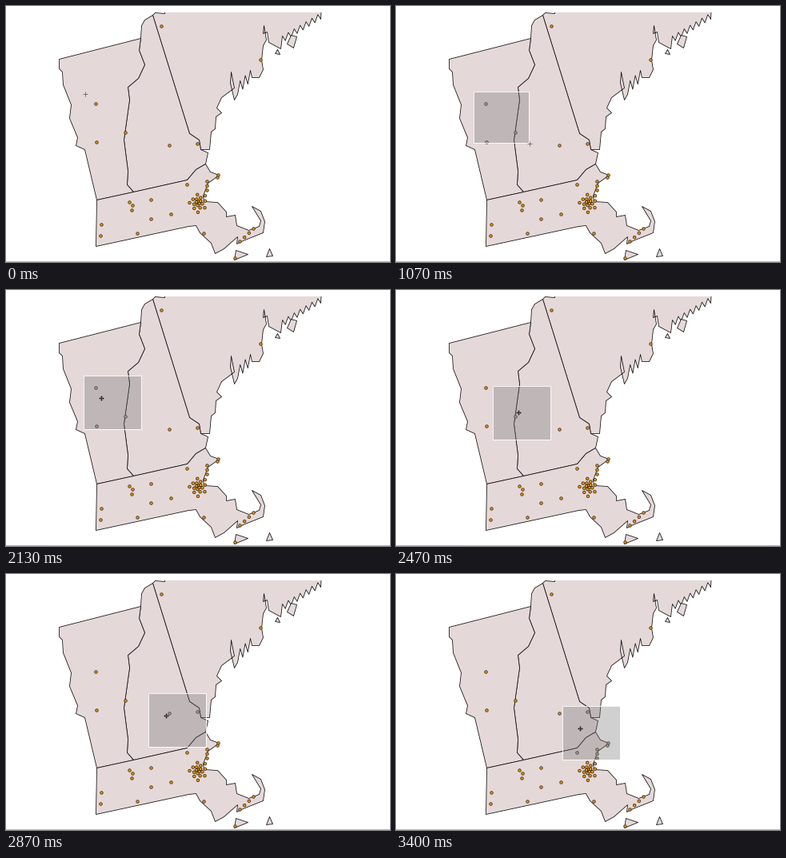
Write a matplotlib script that moves like this. It is 480x320 px and loops after 3740 ms.

```python
import numpy as np
import matplotlib.pyplot as plt
from matplotlib.animation import FuncAnimation
from matplotlib.collections import PolyCollection
from matplotlib.patches import PathPatch, Rectangle
from matplotlib.path import Path

W, H, DPI = 480, 320, 100
PX = 72 / DPI
TICK, LOOP = 10, 3740
STEPS_PER_TICK = 0.15          # the picture advances 15 times a second

LAND, ORANGE, PICKED = "#e5d8d9", "#eb9c1c", "#b0b9bd"


def teeth(start, end, count, depth):
    """Jagged shore: points on a line, pushed down and up in turn."""
    x, y = np.linspace(start, end, count).T
    push = depth * (-1.0) ** np.arange(count)
    return list(zip(x, y + push))


def row(start, end, count):
    return list(np.linspace(start, end, count))


def spiral(center, count, spread):
    """Cluster that is densest in the middle."""
    i = np.arange(count)
    turn = i * np.pi * (3 - np.sqrt(5))
    return list(np.c_[np.cos(turn), np.sin(turn)] * spread * i[:, None] + center)


# Borders shared by neighbouring states
river = [(169, 41), (167, 56), (174, 74), (166, 91), (153, 102), (155, 118),
         (148, 168), (153, 207), (152, 224), (160, 233)]
south = [(160, 233), (227, 218), (238, 205), (250, 198)]
east = [(184, 12), (230, 160), (242, 168), (244, 180)]

vermont = [(67, 67)] + river + [
    (114, 243), (99, 180), (88, 175), (90, 165), (80, 141), (82, 124),
    (72, 99), (71, 83), (67, 79)]
new_hampshire = river + south[1:] + [(253, 184)] + east[::-1] + [
    (174, 18), (170, 25)]
massachusetts = [(114, 243)] + south + [
    (256, 208), (267, 212), (253, 222), (247, 238), (248, 245), (265, 246),
    (276, 258), (276, 264), (287, 262), (289, 275), (304, 281), (317, 276),
    (319, 269), (308, 251), (319, 257), (324, 270), (322, 284), (297, 294),
    (289, 298), (290, 289), (273, 304), (262, 310), (257, 297), (243, 284),
    (238, 275), (229, 276), (113, 301)]
maine = [(184, 12), (187, 9), (199, 10), (199, 0), (395, 0)]
maine += teeth((394, 13), (346, 42), 14, 4)
maine += [(344, 54), (329, 46), (327, 33), (322, 35), (323, 25), (326, 43),
          (322, 50), (320, 68), (322, 80), (317, 90), (308, 90)]
maine += teeth((306, 88), (290, 104), 6, -7)
maine += [(286, 118), (281, 97), (282, 83), (286, 103), (270, 115), (264, 128),
          (270, 134), (263, 139), (262, 154), (257, 158), (255, 180)]
maine += east[::-1]
islands = [[(357, 37), (364, 39), (360, 53), (352, 48)],
           [(340, 55), (343, 61), (337, 60)],
           [(288, 306), (303, 311), (286, 318)],
           [(330, 304), (334, 313), (326, 314)]]

dots = np.array(
    [(195, 26), (319, 68), (113, 123), (150, 159), (114, 171), (205, 175),
     (240, 173), (227, 224), (155, 246), (159, 250), (158, 256), (182, 243),
     (182, 267), (207, 261), (120, 274), (119, 288), (165, 285), (248, 285),
     (287, 316)]
    + row((266, 212), (265, 215), 2) + row((252, 220), (252, 231), 3)
    + row((293, 295), (310, 279), 4) + spiral((241, 246), 20, 0.65))

# Key places of the pointer and the brush
REST, BRUSH_START, BRUSH_END = np.array([(99, 111), (97, 108), (169, 175)])
GRIP, DRAG = np.array([(22, 28), (111, 58)])


def ease(step, begin, end, power=1.0):
    """Progress from 0 to 1; a power above 1 slows down towards the end."""
    return 1 - (1 - np.clip((step - begin) / (end - begin), 0, 1)) ** power


def smooth(t):
    return t * t * (3 - 2 * t)


def stretch(step):
    """Lower right corner while the brush is being drawn."""
    quick = ease(step, 2, 10) * 0.78
    return BRUSH_START + (BRUSH_END - BRUSH_START) * (
        quick + 0.22 * ease(step, 10, 19, 1.4))


def dragged(step, early):
    """Drag offset; the pointer runs ahead of the brush early on."""
    return DRAG * np.interp(step, [33, 37, 40, 47, 51], [0, early, 0.59, 0.92, 1])


def pointer_at(step):
    if step < 2:
        return REST - step
    if step < 27:
        return stretch(step) + ease(step, 2, 4)
    if step < 33:
        back = smooth(ease(step, 26, 32))
        return BRUSH_END + 1 + (BRUSH_START + GRIP - BRUSH_END - 1) * back
    return BRUSH_START + GRIP + dragged(step, 0.31)


def brush_at(step):
    size = (stretch(step) if step < 27 else BRUSH_END) - BRUSH_START
    return np.round(BRUSH_START + dragged(step, 0.22)), np.round(size)


def strokes(*lines):
    return Path.make_compound_path(*[Path(np.array(l, float)) for l in lines])


CROSS = strokes([(-3, 0), (3, 0)], [(0, -3), (0, 3)])
RESIZE = strokes([(-3, -3), (3, 3)], [(-3, -1), (-3, -3), (-1, -3)],
                 [(3, 1), (3, 3), (1, 3)])
MOVE = strokes([(-3, 0), (3, 0)], [(0, -3), (0, 3)],
               [(-1, -2), (1, -2)], [(-1, 2), (1, 2)],
               [(-2, -1), (-2, 1)], [(2, -1), (2, 1)])

fig = plt.figure(figsize=(W / DPI, H / DPI), dpi=DPI, facecolor="white")
ax = fig.add_axes([0, 0, 1, 1])
ax.axis("off")

land = PolyCollection([np.array(s) for s in
                       [maine, new_hampshire, vermont, massachusetts] + islands],
                      facecolor=LAND, edgecolor="#111111", linewidth=0.8 * PX)
ax.add_collection(land, autolim=False)
land.set_clip_path(Rectangle((0, 8.5), W, H, transform=ax.transData))
ax.plot([0, W + 1], [H, H], color="#b8b8b8", lw=PX)

marks = ax.scatter(*dots.T, s=(3.5 * PX) ** 2, c=ORANGE,
                   edgecolors="#3a2809", linewidths=0.8 * PX, zorder=3)
shade = Rectangle((0, 0), 0, 0, fc=(0.467, 0.467, 0.467, 0.34), ec="none", zorder=4)
rim = Rectangle((0, 0), 0, 0, fc="none", ec=(1, 1, 1, 0.85), lw=PX, zorder=4)
pointer = PathPatch(CROSS, fc="none", lw=0.85 * PX, zorder=5)
for patch in (shade, rim, pointer):
    ax.add_patch(patch)
# Half a pixel of shift puts whole coordinates on pixel centres
ax.set(xlim=(0.5, W + 0.5), ylim=(H + 0.5, 0.5))


def draw(tick):
    step = int((tick + 0.5) * STEPS_PER_TICK)

    active = step >= 3
    origin, size = brush_at(step)
    for box in (shade, rim):
        box.set_visible(active)
        box.set_bounds(*origin, *size)
    inside = ((dots >= origin) & (dots <= origin + size)).all(axis=1) & active
    marks.set_facecolor([PICKED if hit else ORANGE for hit in inside])

    if step < 23:
        glyph, ink = CROSS, "#666666"
    elif step < 27:
        glyph, ink = RESIZE, "#111111"
    else:
        glyph, ink = MOVE, "#111111"
    spot = np.round(pointer_at(step))
    pointer.set_path(Path(glyph.vertices + spot, glyph.codes))
    pointer.set_edgecolor(ink)
    return marks, shade, rim, pointer


anim = FuncAnimation(fig, draw, frames=LOOP // TICK, interval=TICK,
                     repeat=True, repeat_delay=0, blit=False)
plt.show()
```
